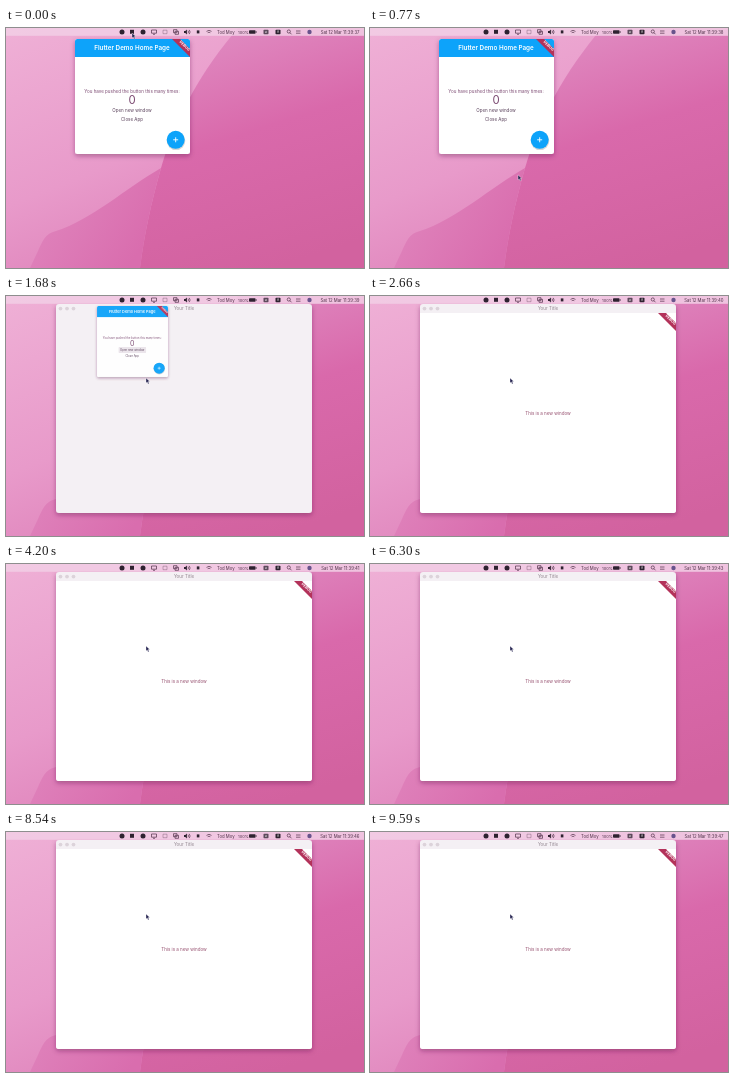
An HTML page for the animation above (9.73 s loop, 358 by 240 pixels).

```html
<!DOCTYPE html>
<html lang="en">
<head>
<meta charset="utf-8">
<title>Multi-window demo</title>
<style>
html, body { margin: 0; height: 100%; overflow: hidden; }
svg { display: block; width: 100vw; height: 100vh; font: 4.5px Inter, Roboto, sans-serif; }
.mid { text-anchor: middle; }
.menu { font-size: 4.3px; fill: #4f3048; }
.body { fill: #7c4a72; }
.line { fill: none; stroke: #4f3048; stroke-width: .7; }
</style>
</head>
<body>
<svg viewBox="0 0 358 240" preserveAspectRatio="none">
  <defs>
    <linearGradient id="left" x1="0" y1="0" x2=".6" y2="1">
      <stop offset="0" stop-color="#efb0d6"/><stop offset=".55" stop-color="#e89aca"/><stop offset="1" stop-color="#dc7cb6"/>
    </linearGradient>
    <linearGradient id="right" x1=".3" y1="0" x2=".6" y2="1">
      <stop offset="0" stop-color="#e08cc2"/><stop offset=".45" stop-color="#d969ab"/><stop offset="1" stop-color="#d2629f"/>
    </linearGradient>
    <linearGradient id="low" x1="0" y1="0" x2="1" y2=".5">
      <stop offset="0" stop-color="#e18ac0"/><stop offset="1" stop-color="#d96dae"/>
    </linearGradient>
    <filter id="shade" x="-20%" y="-20%" width="140%" height="150%">
      <feDropShadow dx="0" dy="2" stdDeviation="2.5" flood-color="#5a1c48" flood-opacity=".42"/>
    </filter>
    <clipPath id="smallClip"><rect x="69" y="11" width="115" height="115" rx="2.5"/></clipPath>
    <clipPath id="bigClip"><rect x="50" y="8" width="256" height="209" rx="3"/></clipPath>
    <!-- corner ribbon, origin at the top right corner -->
    <g id="ribbon">
      <path d="M-18 0h8L0 10v8z" fill="#b3305a"/>
      <text class="mid" transform="translate(-6.2 7.6) rotate(45)" font-size="3.8" font-weight="700" fill="#fff">DEBUG</text>
    </g>
  </defs>

  <rect width="358" height="240" fill="url(#left)"/>
  <path d="M232 0C196 42 170 88 155 140 145 175 138 208 134 240H358V0z" fill="url(#right)"/>
  <path d="M134 240C138 208 145 175 155 140 120 160 85 192 50 203 39 206 37 212 32 223L24 240z" fill="url(#low)"/>

  <g id="small" filter="url(#shade)">
    <g clip-path="url(#smallClip)">
      <rect x="69" y="11" width="115" height="115" fill="#fff"/>
      <rect x="69" y="11" width="115" height="18" fill="#0aa3fa"/>
      <text class="mid" x="126" y="22.4" font-size="6.3" font-weight="600" fill="#fff">Flutter Demo Home Page</text>
      <use href="#ribbon" x="184" y="11"/>
      <g class="body mid">
        <text x="126" y="64.5">You have pushed the button this many times:</text>
        <text x="126" y="75.5" font-size="11.4">0</text>
        <rect id="hover" x="104" y="77.5" width="44.5" height="9.5" rx="1" fill="#ebe5eb"/>
        <text x="126" y="84" fill="#59405a">Open new window</text>
        <text x="126" y="93" fill="#59405a">Close App</text>
      </g>
      <circle cx="170" cy="112.8" r="9.3" fill="#000" opacity=".16"/>
      <circle cx="169.7" cy="111.8" r="9" fill="#0aa3fa"/>
      <path d="M167.2 111.8h5M169.7 109.3v5" stroke="#fff" stroke-width=".9"/>
    </g>
  </g>

  <g id="big" filter="url(#shade)">
    <g clip-path="url(#bigClip)">
      <rect x="50" y="8" width="256" height="209" fill="#f4f0f4"/>
      <g fill="#dcd3da"><circle cx="54.5" cy="12.6" r="1.9"/><circle cx="61" cy="12.6" r="1.9"/><circle cx="67.5" cy="12.6" r="1.9"/></g>
      <text class="mid" x="178" y="14.2" fill="#91848e">Your Title</text>
      <g id="page">
        <rect x="50" y="17" width="256" height="200" fill="#fff"/>
        <text class="mid" x="178" y="119" fill="#96506f">This is a new window</text>
        <use href="#ribbon" x="306" y="17"/>
      </g>
    </g>
  </g>
  <use id="ghost" href="#small"/>

  <rect width="358" height="7.8" fill="#f3cfe6" opacity=".86"/>
  <g fill="#2e2230">
    <circle cx="116" cy="3.9" r="2.5"/>
    <rect x="124" y="1.8" width="4" height="4"/>
    <circle cx="137" cy="3.9" r="2.5"/>
    <rect x="190.8" y="2.4" width="2.6" height="3"/>
    <path d="M178 3h1.3l1.6-1.4v4.8L179.300 5H178z"/>
    <rect x="243" y="2.3" width="6.6" height="3.4" rx=".8"/><rect x="250" y="3.3" width=".6" height="1.4"/>
    <rect x="269.500" y="1.700" width="5" height="4.600" rx=".8"/>
    <rect x="257.500" y="1.700" width="5" height="4.600" rx=".8" opacity=".75"/>
    <circle cx="303.500" cy="4" r="2.200" fill="#68538c"/>
  </g>
  <g class="line">
    <path d="M145.500 2h5v3.200h-5zM147 6.300h2M167.500 1.700h3.500v3h-3.500zM169 3.300h3.500v3H169zM182 2.600q1 1.400 0 2.800M183.300 1.900q1.600 2.100 0 4.200M200.500 3.400q2.500-2.200 5 0M201.700 4.700q1.300-1 2.600 0M284 4.700l1.500 1.600M290 3h4.500M290 5.200h4.500"/>
    <circle cx="282.800" cy="3.500" r="1.600"/>
    <path d="M157 2.200h4v3.500h-4z" opacity=".45"/>
  </g>
  <g fill="#fff" class="mid" font-size="3.200"><text x="260" y="5.200">a</text><text x="272" y="5.200">A</text></g>
  <g class="menu">
    <text x="211" y="5.500">Tod Moy</text>
    <text x="232" y="5.500" font-size="4">100%</text>
    <text id="clock" x="353.500" y="5.500" text-anchor="end"></text>
  </g>

  <path id="cursor" d="M0 0v5l1.200-1 .9 1.900 1-.5-.9-1.800h1.600z" fill="#262451" stroke="#fff" stroke-width=".35"/>
</svg>
<script>
const LOOP = 9730, STEP = 70, OPEN = 1680;
const $ = id => document.getElementById(id);
const show = (id, on) => $(id).style.display = on ? "" : "none";

// time, x, y
const path = [[0, 126, 5], [350, 132, 62], [700, 148, 150], [910, 148, 138], [1330, 140, 82]];

function pointer(t) {
  const i = path.findIndex(p => p[0] > t);
  if (i < 0) return path.at(-1).slice(1);
  const [a, b] = [path[i - 1], path[i]];
  const k = (t - a[0]) / (b[0] - a[0]), e = k * k * (3 - 2 * k);
  return [1, 2].map(j => a[j] + (b[j] - a[j]) * e);
}

function draw(t) {
  const [x, y] = pointer(t), opened = t >= OPEN;
  $("cursor").setAttribute("transform", `translate(${x} ${y})`);
  show("hover", Math.abs(x - 126) < 22 && y > 77 && y < 87);
  $("clock").textContent = "Sat 12 Mar 11:39:" + (38 + Math.floor((t - STEP) / 1050));

  // the first window shrinks over the new one, then goes
  const k = (t - OPEN) / 140, s = .617 - .2 * k;
  show("big", opened);
  show("page", t >= OPEN + 140);
  show("ghost", false);
  show("small", !opened);
  if (opened && k < 1) {
    show("small", true);
    $("big").after($("small"));
    $("small").setAttribute("transform", `translate(126.5 10) scale(${s}) translate(-126.5 -11)`);
    $("small").style.opacity = .95 - .5 * k;
  } else if (!opened) {
    $("big").before($("small"));
    $("small").removeAttribute("transform");
    $("small").style.opacity = 1;
  }
}

const start = performance.now();
(function tick() {
  const t = (performance.now() - start) % LOOP;
  draw(Math.floor(t / STEP) * STEP);
  requestAnimationFrame(tick);
})();
</script>
</body>
</html>
```
